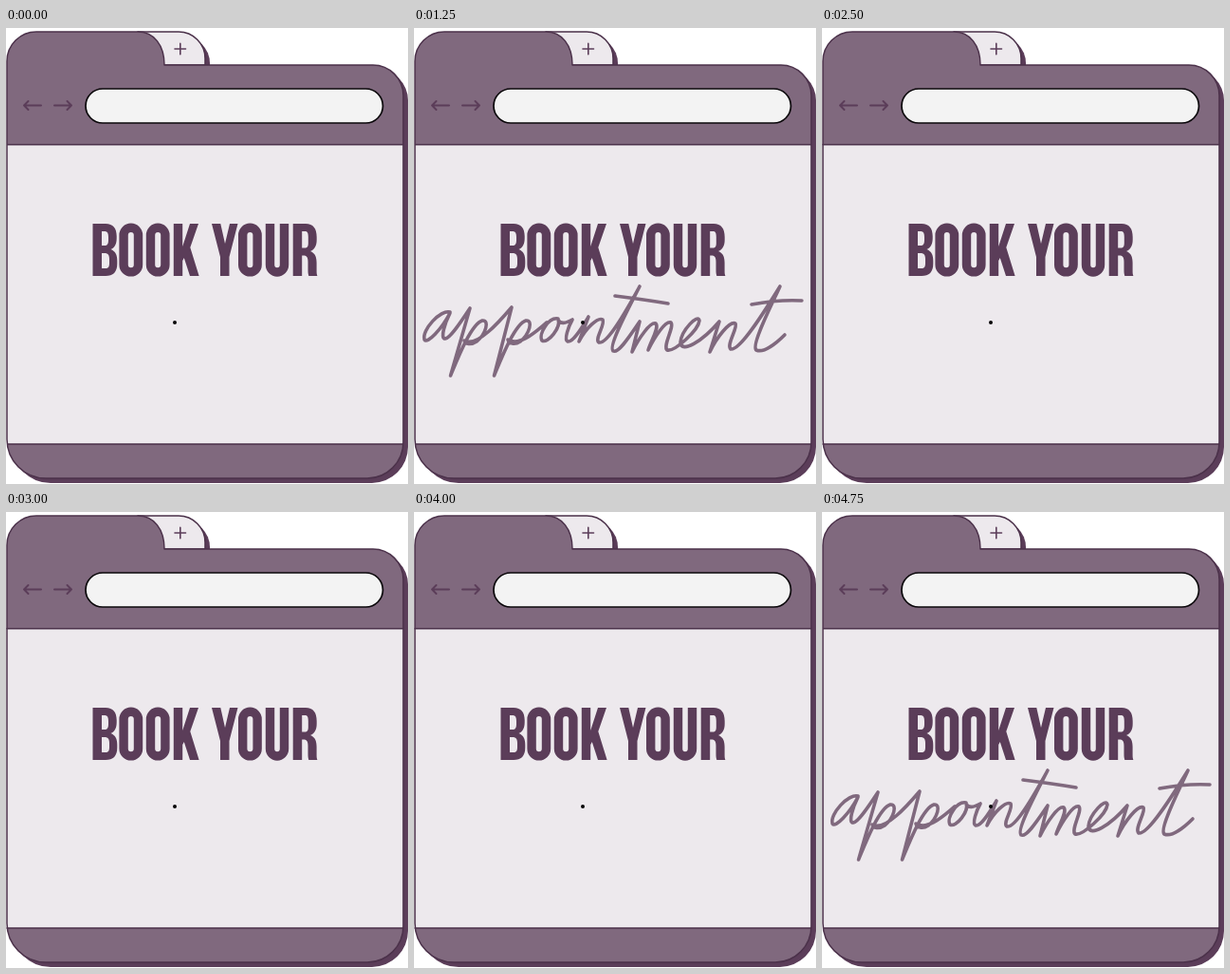
Recreate the animation shown at these times as an HTML page with a canvas. Size 424 by 480 pixels, loop 5000 ms.

```html
<!DOCTYPE html>
<html lang="en">
<head>
<meta charset="utf-8">
<title>Book your appointment</title>
<style>
html, body { margin: 0; width: 100%; height: 100%; overflow: hidden; background: #fff; }
canvas { display: block; width: 100vw; height: 100vh; }
</style>
</head>
<body>
<canvas id="stage" width="424" height="480" role="img" aria-label="BOOK YOUR appointment"></canvas>
<script>
const ctx = document.getElementById('stage').getContext('2d');
const MAUVE = '#80697e', PLUM = '#5b3d59', EDGE = '#4b314a', PAPER = '#ede9ed';
const BLINK = 250;

const body = new Path2D(
  'M1 35A31 31 0 0 1 32 4H139C156 4 167 18 167 39H387A32 32 0 0 1 419 71' +
  'V436A38 38 0 0 1 381 474H42A41 41 0 0 1 1 433Z');
const newTab = new Path2D('M139 4H182A28 28 0 0 1 210 32V39H139Z');

// Condensed capitals
const capitals = new Path2D(
  'M91.5 206H105C113 206 116.7 211 116.7 219V221C116.7 227 115 231 110.5 233' +
  'C115.5 235 117.3 239 117.3 245V248C117.3 257 113 261 105 261H91.5Z' +
  'M101 214V229H104C107 229 108 227 108 223V220C108 216 107 214 104.5 214Z' +
  'M101 237V253H105C108 253 109 251 109 248V243C109 239 107.5 237 104 237Z' +
  'M176.8 206H186.2V230L194 206H203L194.3 231L203.6 261H194L187.8 242L186.2 245V261H176.8Z' +
  'M217 206H226.3L231 227L236 206H244.5L235.5 241V261H226V241Z' +
  'M302.7 206H316C324 206 327.7 211 327.7 220V223C327.7 229 325.5 233 321 235' +
  'C326 237 327.6 241 327.6 247V255C327.6 258 327.7 259.5 328.4 261H319.3' +
  'C318.8 259.5 318.5 258 318.5 255V246C318.5 241 317 239.5 313.5 239.5H312.2V261H302.7Z' +
  'M312.2 214V231.5H315C318 231.5 318.8 230 318.8 226V220C318.8 216 318 214 315.5 214Z');

const script = new Path2D(
  // a p p
  'M38 299C28 296 8 318 11 328C14 333 29 317 38 300C33 310 27 327 33 327C39 326 50 308 59 295' +
  'L38.5 366C46 348 60 312 72 308C80 307 76 322 66 330C60 334 54 333 53 329' +
  'C66 337 91 308 103 294L84.5 366C92 348 106 312 118 308C126 307 122 322 112 330' +
  'C106 334 100 332 99 328' +
  // o i n
  'C112 336 130 318 140 310M152 306C142 304 131 322 135 329C141 333 156 314 152 307' +
  'C154 312 160 311 167 307C163 314 158 328 162 330C168 331 178 314 184 304' +
  'L174 330C181 316 194 304 199 307C202 312 190 328 195 331C205 333 228 290 238 272' +
  // t m
  'C230 288 204 335 210 340C216 343 229 322 238 309L230 341C237 327 249 309 255 311' +
  'C259 315 250 329 247 339C254 325 265 308 271 310C275 314 262 335 267 339' +
  // e n t
  'C275 341 300 318 301 308C300 300 282 318 281 331C282 343 304 330 322 309' +
  'L312 341C319 326 333 308 339 311C342 315 329 334 334 338C344 340 370 298 386 272' +
  'C378 290 355 334 361 339C368 342 380 334 391 323' +
  // crossbars
  'M212 282C228 284 250 287 268 290M356 291C372 288 391 286 409 287');

function fill(path, color, rule = 'nonzero') {
  ctx.fillStyle = color;
  ctx.fill(path, rule);
}

function stroke(path, color, width) {
  ctx.strokeStyle = color;
  ctx.lineWidth = width;
  ctx.stroke(path);
}

function pill(x, y, w, h, r) {
  const p = new Path2D();
  p.roundRect(x, y, w, h, r);
  return p;
}

function drawWindow() {
  // Solid drop shadow
  ctx.save();
  ctx.translate(5, 5);
  fill(newTab, PLUM);
  fill(body, PLUM);
  ctx.restore();

  fill(newTab, PAPER);
  stroke(newTab, EDGE, 1.5);
  fill(body, MAUVE);
  ctx.fillStyle = PAPER;
  ctx.fillRect(1, 123, 418, 315);
  stroke(body, EDGE, 1.5);
  stroke(new Path2D('M1 122.8H419M1 438H419'), EDGE, 1.5);

  const address = pill(84, 64, 313.5, 36, 18);
  fill(address, '#f3f3f3');
  stroke(address, '#0b080b', 1.7);

  ctx.lineCap = ctx.lineJoin = 'round';
  stroke(new Path2D('M37 81.5H19M23.5 77L19 81.5L23.5 86M51 81.5H69M64.5 77L69 81.5L64.5 86'), PLUM, 2);
  stroke(new Path2D('M178 22H189.5M183.8 16.2V27.8'), PLUM, 1.6);
}

function drawHeading() {
  ctx.lineCap = 'butt';
  fill(capitals, PLUM, 'evenodd');
  for (const x of [119.4, 147.8, 245]) {
    stroke(pill(x + 4.7, 210.3, 15.4, 46.6, 7.7), PLUM, 9.4);
  }
  stroke(new Path2D('M278.5 206V249.3A7.5 7.7 0 0 0 293.5 249.3V206'), PLUM, 9.4);
}

function drawScript() {
  ctx.lineCap = ctx.lineJoin = 'round';
  stroke(script, MAUVE, 3.6);
}

function draw(now) {
  ctx.fillStyle = '#fff';
  ctx.fillRect(0, 0, 424, 480);
  drawWindow();
  drawHeading();
  if (Math.floor(now / BLINK) % 2) drawScript();
  fill(pill(176, 308, 4, 4, 2), '#080608');
}

const start = performance.now();
function tick() {
  draw(performance.now() - start);
  requestAnimationFrame(tick);
}
tick();
</script>
</body>
</html>
```
